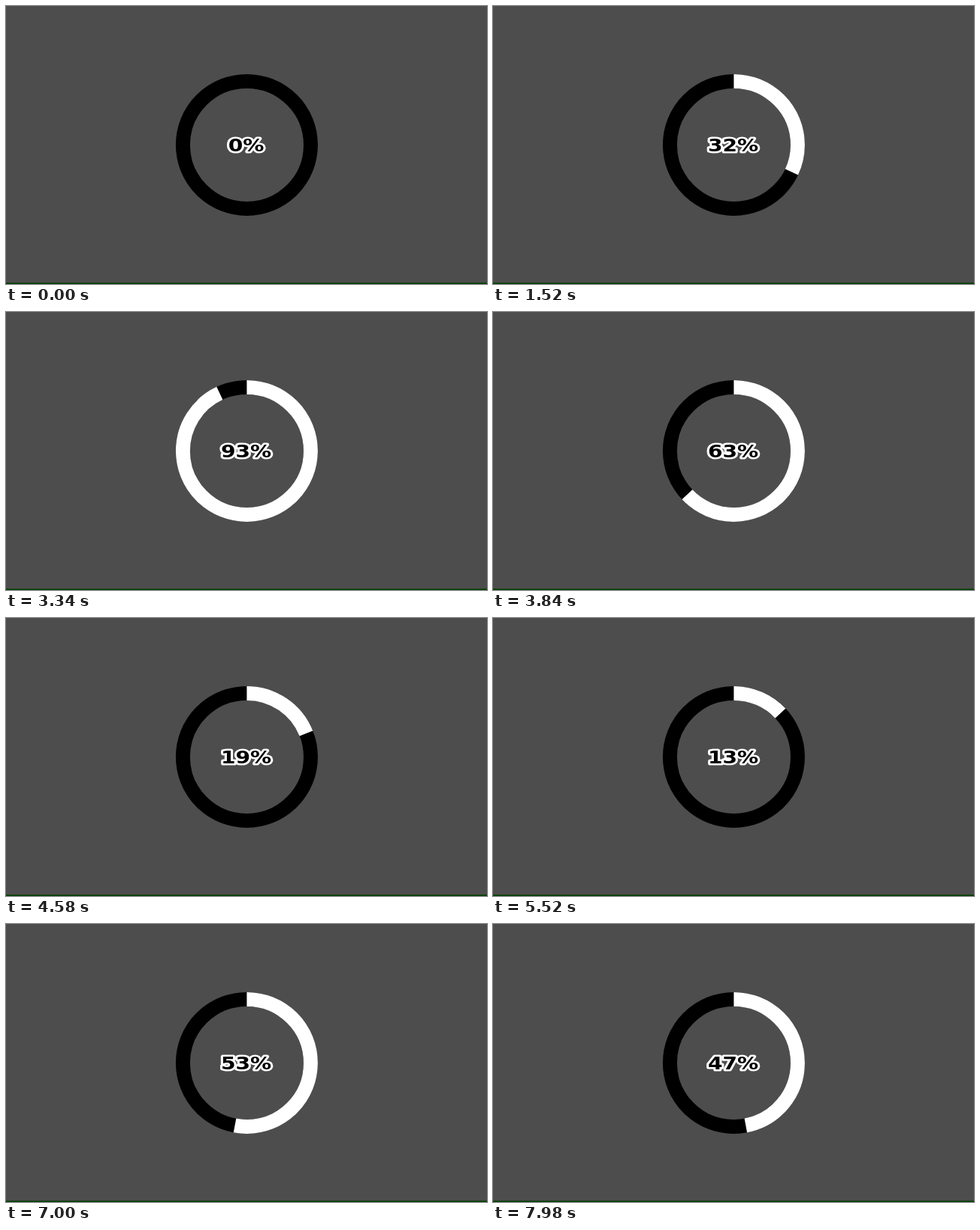
Recreate the animation shown at these times as an HTML page. Size 640 by 371 pixels, loop 8000 ms.

```html
<!DOCTYPE html>
<html lang="en">
<head>
<meta charset="utf-8">
<title>Progress ring</title>
<style>
  html, body { margin: 0; width: 100%; height: 100%; overflow: hidden; background: #4d4d4d; }
  svg { display: block; width: 640px; height: 371px; }
  circle { fill: none; stroke-width: 19; }
  text {
    font: bold 23px "DejaVu Sans", sans-serif;
    text-anchor: middle;
    fill: #000;
    stroke: #fff;
    stroke-width: 5.2px;
    stroke-linejoin: round;
    paint-order: stroke;
  }
</style>
</head>
<body>
<svg viewBox="0 0 640 371">
  <rect width="640" height="371" fill="#4d4d4d"/>
  <rect y="369" width="640" height="1" fill="#1e421e"/>
  <rect y="370" width="640" height="1" fill="#004000"/>
  <g transform="translate(320.4 185.4) rotate(-90)">
    <circle r="85" stroke="#000"/>
    <circle id="arc" r="85" stroke="#fff" pathLength="100" stroke-dasharray="0 200"/>
  </g>
  <text id="label" transform="translate(319.6 194.4) scale(1.22 1)">0%</text>
</svg>
<script>
  const LOOP = 8000, TICK = 20;

  // Each press moves one step at once, then repeats from start to end.
  const presses = [
    { tap: 700, start: 1000, end: 2640, to: 100 },
    { tap: 2720, start: 3240, end: 4900, to: 0 },
    { tap: 4960, start: 5320, end: 6560, to: 73 },
    { tap: 6680, start: 6680, end: 7460, to: 26 },
    { tap: 7660, start: 7660, end: 7980, to: 47 }
  ];

  const arc = document.getElementById('arc');
  const label = document.getElementById('label');

  function percentAt(ms) {
    const t = Math.floor(ms / TICK) * TICK;
    let value = 0;
    for (const { tap, start, end, to } of presses) {
      if (t < tap) break;
      const first = value + Math.sign(to - value);
      const progress = Math.min(1, Math.max(0, (t - start) / (end - start)));
      value = first + (to - first) * progress;
    }
    return Math.round(value);
  }

  function draw(ms) {
    const value = percentAt(ms % LOOP);
    arc.setAttribute('stroke-dasharray', `${value} 200`);
    label.textContent = `${value}%`;
  }

  const origin = performance.now();
  function frame() {
    draw(performance.now() - origin);
    requestAnimationFrame(frame);
  }
  frame();
</script>
</body>
</html>
```
